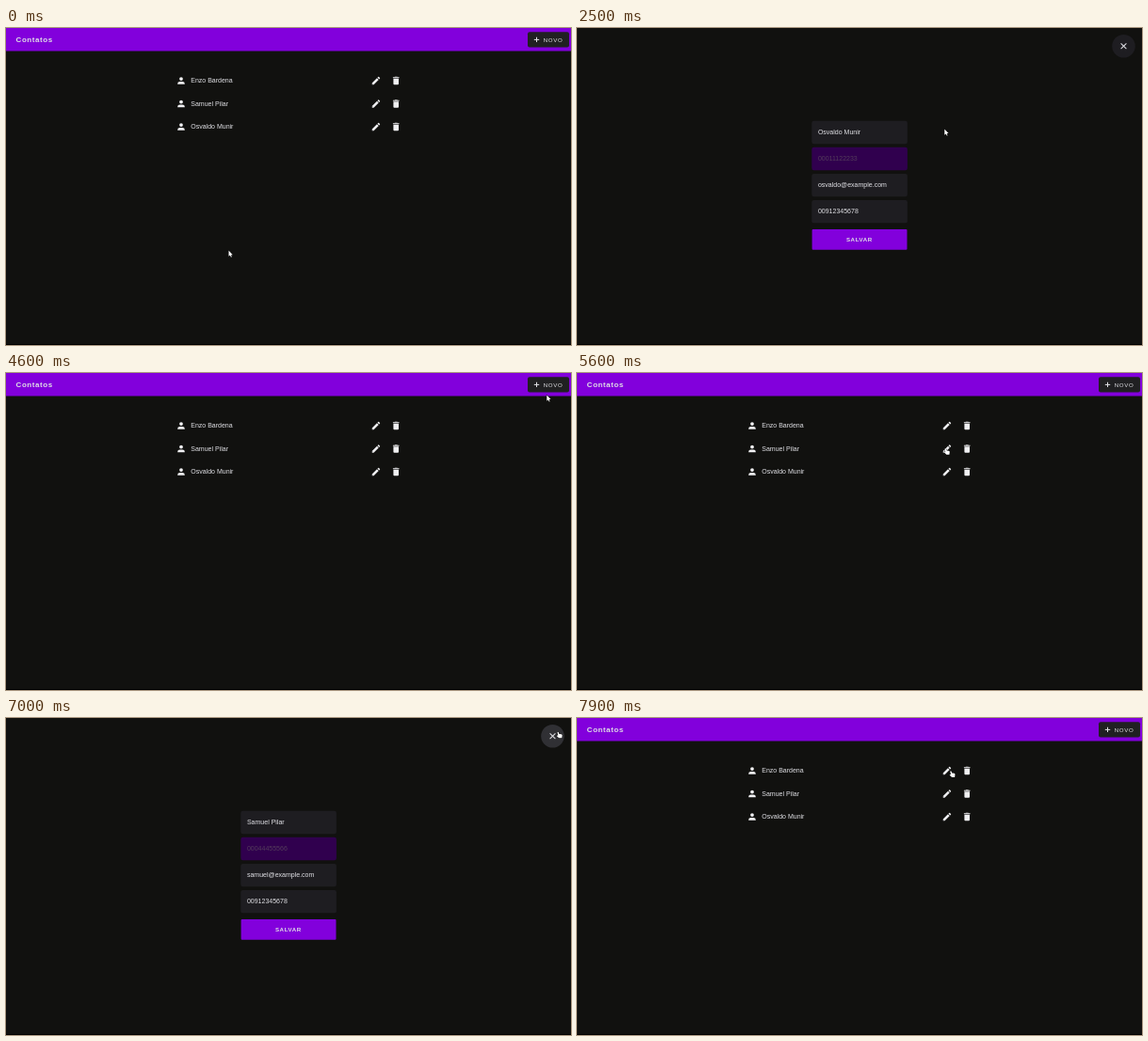
An HTML page with a canvas that plays this animation: 600 by 337 pixels, repeating every 8 s.

```html
<!DOCTYPE html>
<html lang="pt-BR">
<head>
<meta charset="utf-8">
<title>Contatos</title>
<style>
html, body { margin: 0; width: 100%; height: 100%; overflow: hidden; background: #11110f; }
canvas { display: block; width: 600px; height: 337px; }
</style>
</head>
<body>
<canvas id="stage"></canvas>
<script>
const W = 600, H = 337, LOOP = 8000, STEP = 100;
const canvas = document.getElementById('stage');
const ctx = canvas.getContext('2d');
const dpr = window.devicePixelRatio || 1;
canvas.width = Math.round(W * dpr);
canvas.height = Math.round(H * dpr);

const color = {
  page: '#11110f', accent: '#8200dc', panel: '#1e1d21', hover: '#303034',
  text: '#e1e1e6', icon: '#f0f0f2', locked: '#30004e', lockedText: '#543c5b'
};

const contacts = [
  { name: 'Enzo Bardena' },
  { name: 'Samuel Pilar', code: '00044455566', mail: 'samuel@example.com', phone: '00912345678' },
  { name: 'Osvaldo Munir', code: '00011122233', mail: 'osvaldo@example.com', phone: '00912345678' }
];

const column = { person: 186, name: 196.2, edit: 393, trash: 414.2 };
const rowY = i => 56 + i * 24.5;
const newButton = { x: 554, y: 4.2, w: 44, h: 16.2 };
const saveButton = { x: 249.6, y: 213.9, w: 100.9, h: 21.8 };
const closeButton = { x: 580.5, y: 19.2, r: 12.3 };

// Each pointer move is an eased curve bent towards "via".
const home = { x: 236.5, y: 236.5 };
const moves = [
  { start: 400, end: 1500, via: { x: 420, y: -60 }, to: { x: 347.5, y: 147.4 } },
  { start: 1500, end: 2200, via: { x: 325, y: 158 }, to: { x: 390.3, y: 107.4 } },
  { start: 3400, end: 4300, via: { x: 257, y: 370 }, to: { x: 574.3, y: 23.4 } },
  { start: 4700, end: 5600, via: { x: 400, y: 140 }, to: { x: 391.1, y: 80.4 } },
  { start: 6300, end: 7000, via: { x: 455, y: 55 }, to: { x: 586, y: 15 } },
  { start: 7200, end: 7900, via: { x: 400, y: 130 }, to: { x: 396.8, y: 56.6 } }
];
const smooth = u => u * u * (3 - 2 * u);
const bend = (a, b, c, u) => (1 - u) ** 2 * a + 2 * u * (1 - u) * b + u * u * c;

function pointerAt(t) {
  let p = home;
  for (const { start, end, via, to } of moves) {
    if (t <= start) break;
    const u = smooth(Math.min(1, (t - start) / (end - start)));
    p = { x: bend(p.x, via.x, to.x, u), y: bend(p.y, via.y, to.y, u) };
  }
  return p;
}

function openContact(t) {
  if (t >= 2400 && t < 4600) return contacts[2];
  if (t >= 5700 && t < 7100) return contacts[1];
  return null;
}

function at(x, y, paint) {
  ctx.save();
  ctx.translate(x, y);
  paint();
  ctx.restore();
}

function box(x, y, w, h, r, fill) {
  ctx.fillStyle = fill;
  ctx.beginPath();
  ctx.roundRect(x, y, w, h, r);
  ctx.fill();
}

function disc(x, y, r, fill) {
  ctx.fillStyle = fill;
  ctx.beginPath();
  ctx.arc(x, y, r, 0, Math.PI * 2);
  ctx.fill();
}

function label(text, x, y, { size = 7.03, weight = 400, spacing = 0, fill = color.text } = {}) {
  ctx.font = `${weight} ${size}px "Liberation Sans", Arial, sans-serif`;
  ctx.letterSpacing = spacing + 'px';
  ctx.fillStyle = fill;
  ctx.fillText(text, x, y);
}

function cross(x, y, r, turn) {
  at(x, y, () => {
    ctx.rotate(turn);
    box(-r, -0.5, 2 * r, 1, 0, color.text);
    box(-0.5, -r, 1, 2 * r, 0, color.text);
  });
}

function personIcon() {
  disc(0, -1.9, 1.9, color.icon);
  box(-3.8, 0.9, 7.6, 2.9, [2.4, 2.4, 0, 0], color.icon);
}

function editIcon() {
  ctx.rotate(-Math.PI / 4);
  box(-4.8, -1.25, 7.4, 2.5, 0, color.icon);
  box(3.3, -1.25, 1.7, 2.5, [0, 0.6, 0.6, 0], color.icon);
  ctx.fill(new Path2D('M-6 0L-4.7-1.25V1.25z'));
}

function trashIcon() {
  box(-2.8, -2.35, 5.6, 6.6, [0, 0, 0.9, 0.9], color.icon);
  box(-3.3, -3.75, 6.6, 0.95, 0, color.icon);
  box(-1.4, -4.25, 2.8, 0.6, 0, color.icon);
}

const inside = (p, { x, y, w, h }) => p.x >= x && p.x <= x + w && p.y >= y && p.y <= y + h;
const near = (p, x, y, reach) => Math.abs(p.x - x) <= reach && Math.abs(p.y - y) <= reach;

// Both views return whether the pointer is over something clickable.
function drawList(p) {
  let clickable = inside(p, newButton);
  box(0, 0, W, 24.4, 0, color.accent);
  label('Contatos', 10.6, 15.2, { size: 8, weight: 700, spacing: 0.55 });
  box(newButton.x, newButton.y, newButton.w, newButton.h, 2, clickable ? color.hover : '#202022');
  cross(563.5, 12.4, 2.7, 0);
  label('NOVO', 570.8, 14.7, { size: 6.15, spacing: 0.6 });
  contacts.forEach(({ name }, i) => {
    const y = rowY(i);
    at(column.person, y, personIcon);
    label(name, column.name, y + 2.4);
    at(column.edit, y, editIcon);
    at(column.trash, y, trashIcon);
    clickable ||= near(p, column.edit, y, 5) || near(p, column.trash, y, 5);
  });
  return clickable;
}

function drawForm(contact, p) {
  const { x, y, r } = closeButton;
  const overClose = Math.hypot(p.x - x, p.y - y) < r;
  disc(x, y, r, overClose ? color.hover : color.panel);
  cross(x, y + 0.1, 4.1, Math.PI / 4);
  [contact.name, contact.code, contact.mail, contact.phone].forEach((value, i) => {
    const top = 98.8 + i * 28.05, locked = i === 1;
    box(249.3, top, 101.6, 24.4, 2.2, locked ? color.locked : color.panel);
    label(value, 255.9, top + 14.4, { fill: locked ? color.lockedText : color.text });
  });
  box(saveButton.x, saveButton.y, saveButton.w, saveButton.h, 1, color.accent);
  label('SALVAR', 285.9, 226.9, { size: 6.15, weight: 700, spacing: 0.6 });
  return overClose || inside(p, saveButton);
}

const arrow = new Path2D('M0 0V7L1.6 5.6L2.7 8L3.7 7.5L2.7 5.2H4.8z');
const hand = new Path2D('M-.6 .1Q.2-.7 .9 .2L1.6 2.2L4.2 2.5Q5.3 2.8 5.2 4L4.8 7H1.4L-1.2 4.6Q-1.3 3.7-.3 3.9L.3 4.2z');

function drawPointer(p, clickable) {
  const shape = clickable ? hand : arrow;
  at(p.x, p.y, () => {
    ctx.scale(0.9, 0.9);
    ctx.lineWidth = 0.8;
    ctx.strokeStyle = '#000';
    ctx.stroke(shape);
    ctx.fillStyle = '#fff';
    ctx.fill(shape);
  });
}

function draw(t) {
  const p = pointerAt(t), contact = openContact(t);
  ctx.setTransform(dpr, 0, 0, dpr, 0, 0);
  box(0, 0, W, H, 0, color.page);
  box(0, 336, W, 1, 0, '#000');
  drawPointer(p, contact ? drawForm(contact, p) : drawList(p));
}

const start = performance.now();
function tick() {
  const t = (performance.now() - start) % LOOP;
  draw(Math.floor(t / STEP) * STEP);
  requestAnimationFrame(tick);
}
tick();
</script>
</body>
</html>
```
